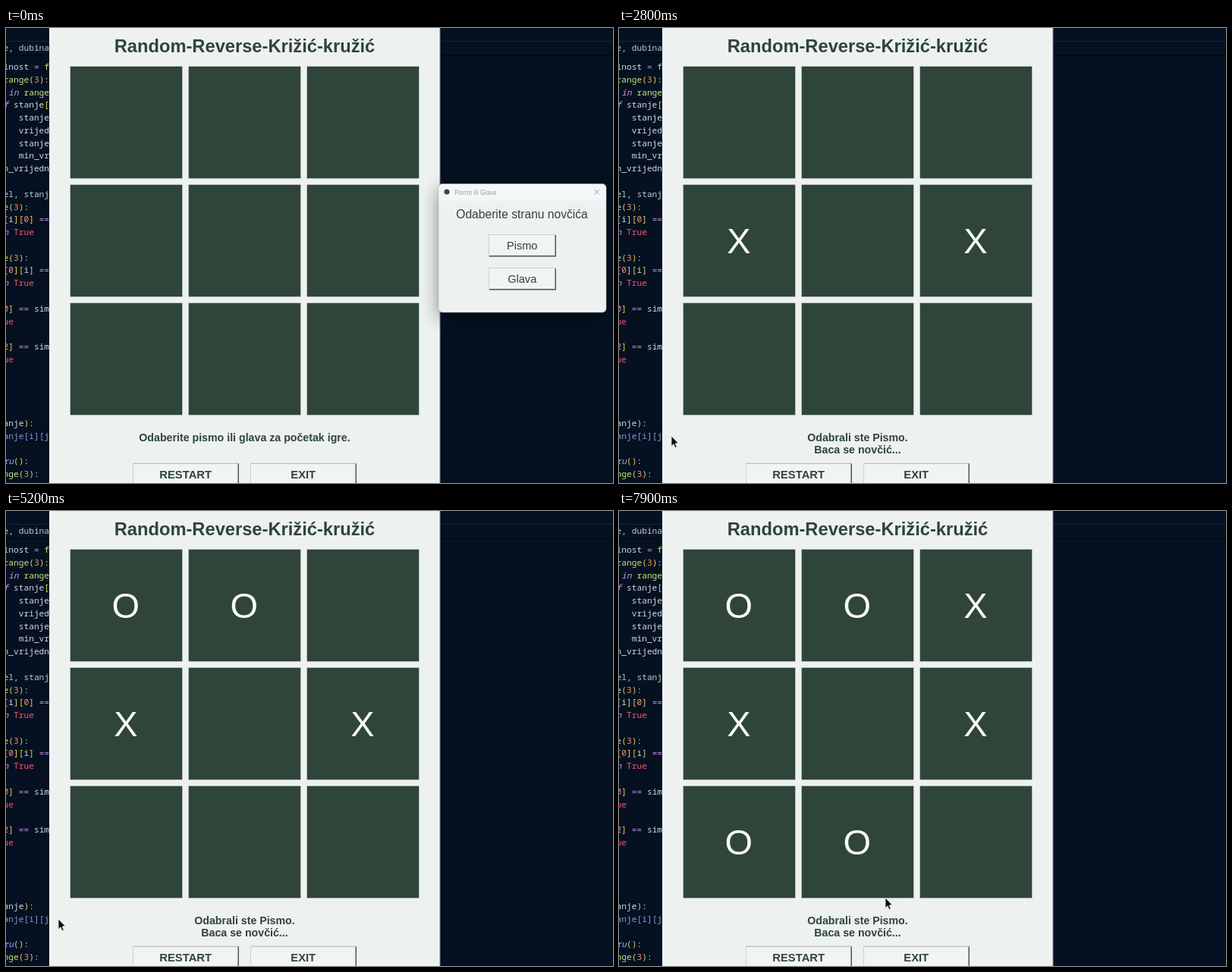
An HTML page with a canvas that plays this animation: 800 px wide and 600 px high, repeating every 8 s.

```html
<!DOCTYPE html>
<html lang="hr">
<head>
<meta charset="utf-8">
<style>
html, body { margin: 0; width: 100%; height: 100%; overflow: hidden; background: #051121; }
canvas { display: block; }
</style>
</head>
<body>
<canvas id="stage" width="800" height="600"></canvas>
<script>
const ctx = document.getElementById('stage').getContext('2d');
const LOOP = 8000, STEP = 100;
const GREEN = '#2f4539', PAPER = '#edf2f1';
const SANS = '"Liberation Sans", Arial, sans-serif';
const MONO = '"Noto Sans Mono", "DejaVu Sans Mono", monospace';

// [row, text]; row -1.49 is the pinned header line
const code = [
  [-1.49, 'e, dubina'], [0, 'lnost = f'], [1, 'range(3):'], [2, ' in range'],
  [3, 'f stanje['], [4, '   stanje'], [5, '   vrijed'], [6, '   stanje'],
  [7, '   min_vr'], [8, 'n_vrijedn'], [10, 'el, stanj'], [11, 'e(3):'],
  [12, '[i][0] =='], [13, 'n True'], [15, 'e(3):'], [16, '[0][i] =='],
  [17, 'n True'], [19, '0] == sim'], [20, 'ue'], [22, '2] == sim'], [23, 'ue'],
  [28, 'anje):'], [29, 'anje[i][j'], [31, 'ru():'], [32, 'nge(3):']
];
const tokenRules = [
  [/^(True|ue)$/, '#f0566e'],
  [/^\d$/, '#f78c6c'],
  [/^[()[\]]$/, '#e6cf5a'],
  [/^=+$/, '#c792ea'],
  [/^(in|n|f)$/, '#c792ea', 'italic '],
  [/^(range|nge|e)$/, '#c5e478'],
  [/^ru$/, '#82aaff', 'italic ']
];

// Board marks: [time, column, row, symbol]
const marks = [
  [1500, 2, 1, 'X'], [2400, 0, 1, 'X'], [3700, 1, 0, 'O'], [4800, 0, 0, 'O'],
  [5500, 0, 2, 'O'], [6700, 2, 0, 'X'], [7500, 1, 2, 'O']
];

const TOSS = 'Baca se novčić...';
const MINE = 'Pala je glava. Ja sam na redu :)';
const YOURS = 'Palo je pismo. Vi ste na redu!';
const DIALOG_END = 500;
const status = [
  [500, TOSS], [1000, YOURS], [1500, TOSS], [2100, YOURS], [2400, TOSS],
  [3400, MINE], [4400, TOSS], [4700, MINE], [5000, TOSS], [5300, MINE],
  [5700, TOSS], [6000, YOURS], [6700, TOSS], [7200, MINE], [7700, TOSS]
];

// Pointer stops: [time, x, y]
const pointer = [
  [500, 682, 288], [800, 351, 324], [1000, 351, 324], [1400, 470, 290],
  [1500, 470, 290], [1900, 65, 393], [2000, 65, 393], [2300, 150, 300],
  [2400, 150, 300], [2700, 69, 538], [6200, 69, 538], [6600, 470, 140],
  [6700, 470, 140], [7100, 351, 510], [8000, 351, 510]
];

function rect(x, y, w, h, fill) {
  ctx.fillStyle = fill;
  ctx.fillRect(x, y, w, h);
}

function text(str, x, y, font, fill, align = 'center') {
  ctx.font = font;
  ctx.fillStyle = fill;
  ctx.textAlign = align;
  ctx.fillText(str, x, y);
}

function drawCode() {
  for (const [row, line] of code) {
    const y = 55 + row * 16.78;
    for (const { 0: token, index } of line.matchAll(/\w*[a-z_]\w*|=+|\S/gi)) {
      let [, color, style = ''] = tokenRules.find(r => r[0].test(token)) || [0, '#d0d8e4'];
      if (row === -1.49 || row === 10) [color, style] = ['#b9cbc9', ''];
      if (row === 29) color = '#9093dc';
      if (token === 'f' && row === 0) [color, style] = ['#c5e478', ''];
      text(token, -3.4 + index * 6.72, y, style + '11.2px ' + MONO, color, 'left');
    }
  }
}

function button(label, x, y, w, h, font) {
  rect(x, y, w, h, '#cbd1d0');
  rect(x + 1, y + 1, w - 1, h - 1, '#4c5854');
  rect(x + 1, y + 1, w - 2.5, h - 2.5, '#f0f4f3');
  text(label, x + w / 2 - 0.3, y + h / 2 + 5, font, GREEN);
}

function drawBoard(t) {
  rect(57, 0, 515, 600, PAPER);
  rect(571.5, 0, 1, 600, '#78838a');
  text('Random-Reverse-Križić-kružić', 314.5, 32, 'bold 23.7px ' + SANS, GREEN);
  for (let i = 0; i < 9; i++) {
    const x = 85 + i % 3 * 156, y = 51 + Math.floor(i / 3) * 156;
    rect(x - 0.5, y - 0.5, 148, 148, '#78867f');
    rect(x, y, 147, 147, GREEN);
  }
  for (const [at, col, row, symbol] of marks)
    if (t >= at) text(symbol, 157.8 + col * 156, 140.5 + row * 156, '47px ' + SANS, '#fafcfb');

  const font = 'bold 14.2px ' + SANS;
  const last = status.filter(s => t >= s[0]).pop();
  text(last ? 'Odabrali ste Pismo.' : 'Odaberite pismo ili glava za početak igre.', 314.5, 545, font, GREEN);
  if (last) text(last[1], 314.5, 561, font, GREEN);

  const bold = 'bold 14.8px ' + SANS;
  button('RESTART', 167, 573.5, 140, 31, bold);
  button('EXIT', 322, 573.5, 140, 31, bold);
}

function drawDialog() {
  ctx.save();
  ctx.shadowColor = 'rgba(0,0,0,.45)';
  ctx.shadowBlur = 22;
  ctx.shadowOffsetY = 7;
  ctx.fillStyle = PAPER;
  ctx.beginPath();
  ctx.roundRect(570, 205.5, 221, 169.5, 5);
  ctx.fill();
  ctx.restore();
  ctx.strokeStyle = '#a9b2b5';
  ctx.lineWidth = 0.6;
  ctx.stroke();
  ctx.fillStyle = '#f4f7f8';
  ctx.beginPath();
  ctx.roundRect(570.5, 206, 220, 22, [5, 5, 0, 0]);
  ctx.fill();

  ctx.fillStyle = '#34495c';
  ctx.beginPath();
  ctx.arc(581, 216, 3.6, 0, 7);
  ctx.fill();
  text('Pismo ili Glava', 591, 219.5, '8.2px "Open Sans", sans-serif', '#8d9496', 'left');
  ctx.strokeStyle = '#8b9294';
  ctx.lineWidth = 0.9;
  ctx.beginPath();
  ctx.moveTo(775.5, 213); ctx.lineTo(782, 219.5);
  ctx.moveTo(782, 213); ctx.lineTo(775.5, 219.5);
  ctx.stroke();

  text('Odaberite stranu novčića', 680, 251, '15.6px ' + SANS, GREEN);
  button('Pismo', 636, 272, 89, 29.5, '14.6px ' + SANS);
  button('Glava', 636, 316, 89, 29.5, '14.6px ' + SANS);
}

function drawPointer(t) {
  const i = pointer.findIndex(p => p[0] > t);
  const [t0, x0, y0] = pointer[i - 1], [t1, x1, y1] = pointer[i];
  const k = (t - t0) / (t1 - t0), ease = k * k * (3 - 2 * k);
  ctx.save();
  ctx.translate(x0 + (x1 - x0) * ease, y0 + (y1 - y0) * ease);
  ctx.beginPath();
  for (const [x, y] of [[0, 0], [0, 13.5], [3, 10.8], [5, 15.5], [7.2, 14.5], [5.2, 10], [9, 9.5]])
    ctx.lineTo(x, y);
  ctx.closePath();
  ctx.fillStyle = '#0a0d0e';
  ctx.strokeStyle = '#dfe5e3';
  ctx.lineWidth = 0.9;
  ctx.fill();
  ctx.stroke();
  ctx.restore();
}

function draw(t) {
  rect(0, 0, 800, 600, '#051121');
  rect(0, 17, 800, 1, '#132539');
  rect(0, 35, 800, 2, '#020a16');
  drawCode();
  drawBoard(t);
  if (t < DIALOG_END) drawDialog();
  else drawPointer(t);
}

const start = performance.now();
function frame() {
  const t = (performance.now() - start) % LOOP;
  draw(Math.floor(t / STEP) * STEP);
  requestAnimationFrame(frame);
}
frame();
</script>
</body>
</html>
```
